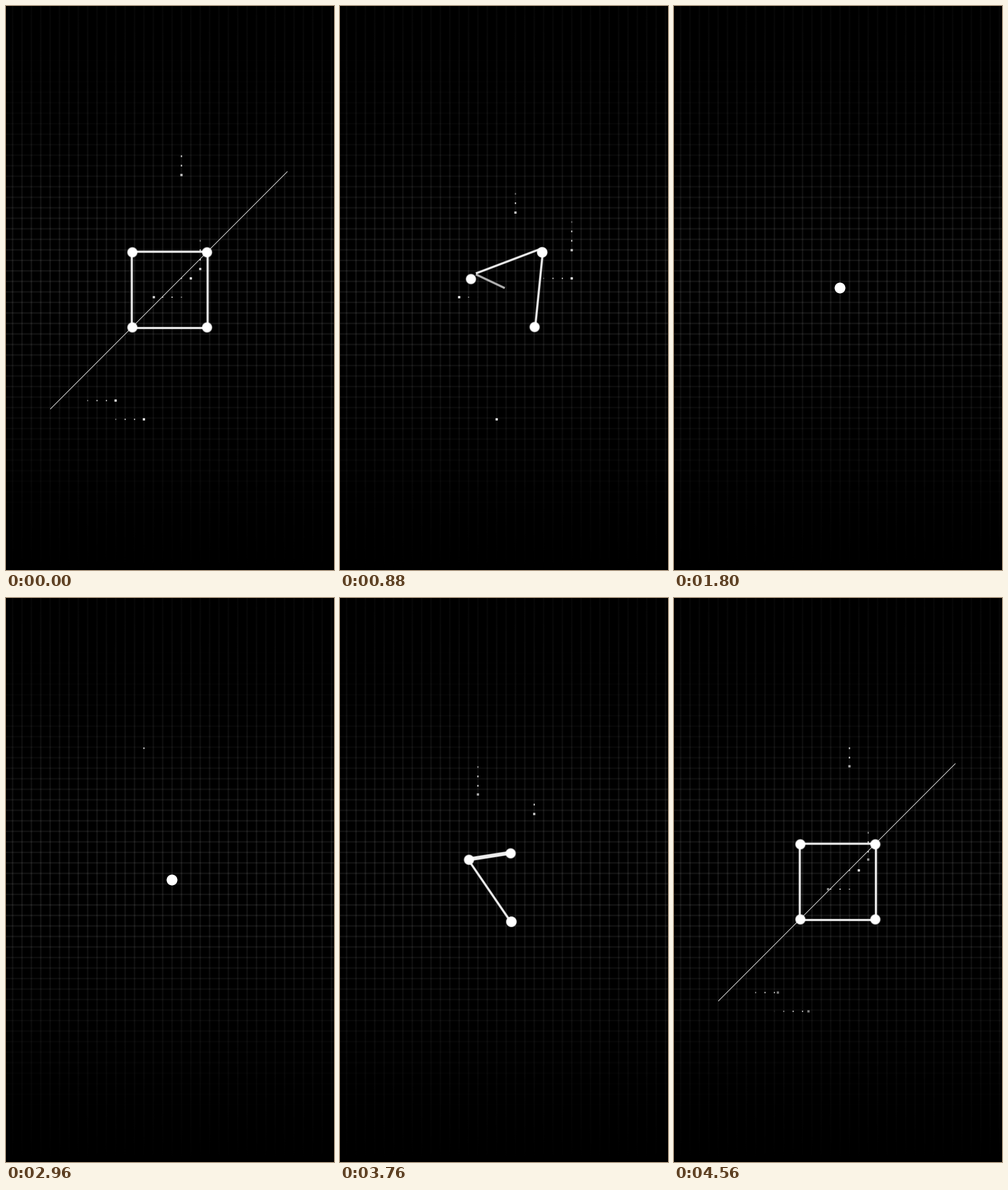
Write an HTML page with a canvas that moves like this. It is 571 by 980 pixels and loops after 4.6 s.

```html
<!DOCTYPE html>
<html lang="en">
<head>
<meta charset="utf-8">
<title>Grid shapes</title>
<style>
html, body { margin: 0; width: 100%; height: 100%; overflow: hidden; background: #000; }
canvas { display: block; width: 571px; height: 980px; }
</style>
</head>
<body>
<canvas id="stage" width="571" height="980"></canvas>
<script>
const LOOP = 4600, FRAME = 40, W = 571, H = 980;
const CELL = 16.33, STEP = 176, TAIL_LIFE = 680;
const LEFT = 220, RIGHT = 350, TOP = 428, SIDE = 130.5, BOTTOM = TOP + SIDE;
const CENTRE = [289, 490];
const ctx = document.getElementById('stage').getContext('2d');

const clamp = v => Math.min(1, Math.max(0, v));
const smooth = v => (v = clamp(v), v * v * (3 - 2 * v));
const ease = (t, from, to) => smooth((t - from) / (to - from));
const pulse = (t, from, peak, to) => ease(t, from, peak) * (1 - ease(t, peak, to));
const mix = (a, b, k) => [a[0] + (b[0] - a[0]) * k, a[1] + (b[1] - a[1]) * k];
const shift = (p, x, y) => [p[0] + x, p[1] + y];
const polar = (p, degrees, r) => {
  const a = degrees * Math.PI / 180;
  return shift(p, r * Math.cos(a), r * Math.sin(a));
};
const grey = (v, a = 1) => `rgba(${v},${v},${v},${a})`;

function line(a, b, width, style) {
  ctx.lineWidth = width;
  ctx.strokeStyle = style;
  ctx.beginPath();
  ctx.moveTo(...a);
  ctx.lineTo(...b);
  ctx.stroke();
}

// Soft bar, pushed outwards from the clockwise outline
function edge(a, b, width = 3, alpha = 1) {
  const dx = b[0] - a[0], dy = b[1] - a[1], len = Math.hypot(dx, dy);
  if (len < 2) return;
  a = shift(a, dy / len, -dx / len);
  b = shift(b, dy / len, -dx / len);
  line(a, b, width + 1.6, grey(255, .4 * alpha));
  line(a, b, width, grey(238, alpha));
}

function knob([x, y]) {
  const g = ctx.createRadialGradient(x, y, 7.6, x, y, 9.8);
  g.addColorStop(0, '#fff');
  g.addColorStop(1, grey(255, 0));
  ctx.fillStyle = g;
  ctx.fillRect(x - 10, y - 10, 20, 20);
}

function drawGrid() {
  const fade = ctx.createLinearGradient(0, 0, 0, H);
  fade.addColorStop(0, grey(255, .025));
  fade.addColorStop(.5, grey(255, .085));
  fade.addColorStop(1, grey(255, 0));
  for (let x = 11.5; x < W; x += CELL) line([x, 0], [x, H], 2.6, fade);
  for (let y = 3.5; y < H; y += 18.27) {
    const c = Math.max(0, Math.cos((y - 490) / 290));
    line([0, y], [W, y], 2.6, grey(255, .075 * c * c));
  }
}

// Dots that hop from cell to cell and leave a fading tail
const fall = (col, row, start) => ({ col, row, start, dx: 0, dy: 1, cells: 6 });
const slide = (col, row, start, dx = 1, cells = 6) => ({ col, row, start, dx, dy: 0, cells });
const runners = [
  fall(14, 0, 2920), fall(20, 6, 3550), fall(18, 0, 4248), fall(24, 6, 150),
  slide(10, 28, 3915), slide(8, 26, 4105, 1, 3), slide(18, 15, 4110, -1), slide(18, 13, 4400)
];

function drawRunner({ col, row, start, dx, dy, cells }, t) {
  const age = (t - start + LOOP) % LOOP, end = cells * STEP;
  const raw = Math.min(age / STEP, cells), k = Math.floor(raw);
  const hop = smooth((raw - k - .4) / .45), pos = k + hop;
  const dot = (n, w, h, alpha) => {
    ctx.fillStyle = grey(255, alpha);
    ctx.fillRect(11.5 + (col + dx * n) * CELL - w / 2, 261 + (row + dy * n) * CELL - h / 2, w, h);
  };
  for (let n = 0; n < cells && n < pos; n++) {
    const left = 1 - (age - n * STEP) / TAIL_LIFE;
    if (left > 0) dot(n, 2, 2 + dy, Math.min(.85, left * 1.8));
  }
  const rest = clamp((cells * 95 - (age - end)) / 60);
  const size = age < 80 ? 2.5 : 4;
  dot(pos, size, size, rest * (1 - 2 * hop * (1 - hop)) * (dy ? .75 : .9));
}

function drawDiagonal(t) {
  const late = t > LOOP / 2, lower = late ? 490 - 413 * ease(t, 4280, 4520) : 77 - 80 * ease(t, 10, 170);
  const upper = late ? 490 : 490 - 495 * ease(t, 10, 350);
  if (upper - lower > 1) line([lower, 777.5 - lower], [upper, 777.5 - upper], 1.1, grey(200));
}

// Square to triangle to two hinged rods to one dot
function collapse(t) {
  const home = ease(t, 900, 1760), lift = pulse(t, 480, 880, 1200);
  const bump = Math.sin(Math.PI * clamp(t / 880));
  const left = mix([LEFT + 8 * ease(t, 480, 880), BOTTOM - 84 * ease(t, 0, 720)], CENTRE, home);
  const top = mix([RIGHT - 4 * bump + 2 * lift, TOP - 10 * bump], CENTRE, home);
  const follow = ms => mix([LEFT, TOP], top, ease(t, 0, ms));
  const hinge = polar(top, 90 - 4 * bump + 68 * ease(t, 810, 1200), SIDE);
  const low = mix(hinge, left, ease(t, 1040, 1200));
  const lead = follow(540);

  const anchor = shift(left, 9 * lift, -9 * lift);
  const tip = mix(mix(low, CENTRE, ease(t, 520, 880)), anchor, ease(t, 860, 1040));
  edge(lead, top);
  edge(anchor, shift(follow(640), 0, -6 * lift));
  edge(top, low);
  edge(tip, anchor, 3, 1 - .35 * ease(t, 520, 880));
  [lead, top, low, left].forEach(knob);
}

// One dot to a swinging rod to a square
function unfold(t) {
  const out = mix(CENTRE, [228, 475], ease(t, 2960, 3500));
  const a = mix(out, [LEFT, TOP], ease(t, 3480, 4100));
  const grow = ease(t, 3500, 3980);
  const b = polar(a, -20 * (1 - grow), SIDE * grow);
  const c = polar(a, 90 * ease(t, 3430, 4000), SIDE * ease(t, 2960, 3480));
  const d = polar(c, 0, SIDE * ease(t, 3960, 4420));

  edge(a, b, 3 + 3 * pulse(t, 3480, 3760, 4100));
  edge(b, mix(b, d, ease(t, 4280, 4480)));
  edge(d, c);
  edge(c, a);
  [a, b, c, d].forEach(knob);
}

function draw(t) {
  ctx.fillStyle = '#000';
  ctx.fillRect(0, 0, W, H);
  drawGrid();
  runners.forEach(r => drawRunner(r, t));
  drawDiagonal(t);
  (t < LOOP / 2 ? collapse : unfold)(t);
}

const begin = performance.now();
function tick() {
  const t = (performance.now() - begin) % LOOP;
  draw(Math.floor(t / FRAME) * FRAME);
  requestAnimationFrame(tick);
}
tick();
</script>
</body>
</html>
```
